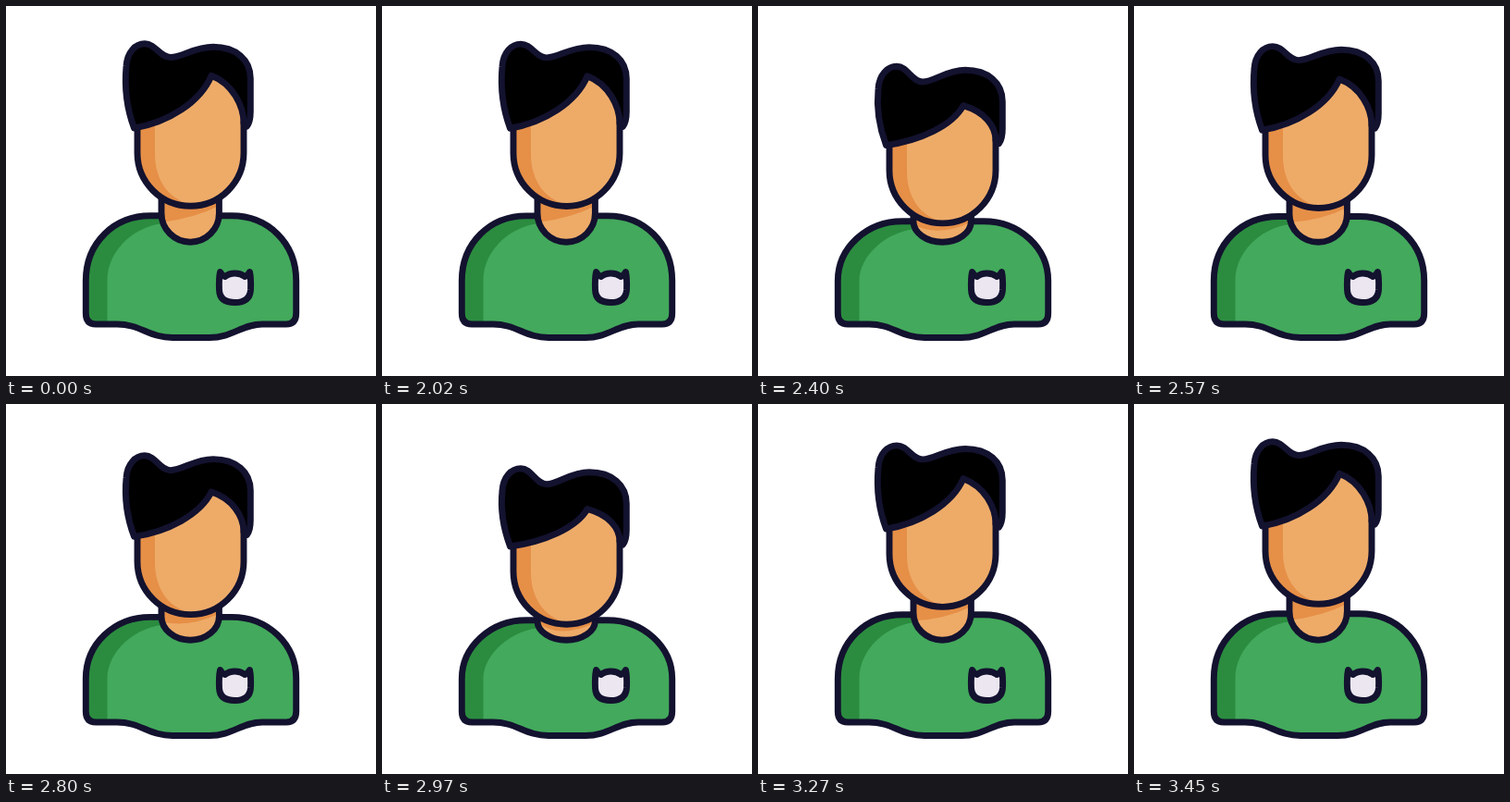
Write an HTML page that moves like this. It is 400 px wide and 400 px high and loops after 3470 ms.

```html
<!DOCTYPE html>
<html lang="en">
<head>
<meta charset="utf-8">
<title>Nodding avatar</title>
<style>
  html, body { margin: 0; width: 100%; height: 100%; overflow: hidden; background: #fff; }
  svg { display: block; width: 100vw; height: 100vh; }
  .line { stroke: #13122f; stroke-width: 6.9; stroke-linecap: round; stroke-linejoin: round; }
</style>
</head>
<body>
<svg viewBox="0 0 400 400">
  <path id="shirt" fill="#43a95c"/>
  <path id="shirtShade" fill="#2b8c3f"/>
  <path id="shirtLine" class="line" fill="none"/>
  <path class="line" fill="#ebe6ef" d="M231.5 287.5Q234 292 237 292.5Q241 289 247.5 289Q254 289 258 292.5Q261 292 263.5 287.5Q265 294 264.5 307Q263.5 320.5 247.5 320.5Q231 320.5 230.5 307Q230 294 231.5 287.5Z"/>
  <path id="neck" fill="#eeab68"/>
  <path id="neckShade" fill="#e68f47"/>
  <path id="neckLine" class="line" fill="none"/>
  <g id="face">
    <path fill="#eeab68" d="M142 76V158.5A57.5 57.5 0 0 0 257 158.5V76Z"/>
    <path fill="#e68f47" d="M142 110H161V160C161 190 178 212 205 215.5A57.5 57.5 0 0 1 142 158.5Z"/>
    <path class="line" fill="none" d="M142 130V158.8A57.5 57.5 0 0 0 257 158.8V126"/>
  </g>
  <path id="hair" class="line"/>
</svg>
<script>
const LOOP = 3470;
const PEAK = 1.16;
const el = id => document.getElementById(id);
const draw = (id, d) => el(id).setAttribute('d', d);
const ease = x => (1 - Math.cos(Math.PI * x)) / 2;

// Two nods; the last rise settles slowly.
const keys = [[2000, 0], [2320, PEAK], [2635, 0], [2960, PEAK], [3460, 0]];

function nodAt(t) {
  const i = keys.findIndex(([time]) => t < time);
  if (i < 1) return 0;
  const [t0, a] = keys[i - 1], [t1, b] = keys[i];
  let x = (t - t0) / (t1 - t0);
  if (i === keys.length - 1) x = 1 - (1 - x) ** 1.45;
  return a + (b - a) * ease(x);
}

function pose(p) {
  const s = 226.8 + 6 * p;
  const shoulder = `M86.3 297C86.3 ${s + 29} 117 ${s} 156 ${s}`;
  const shirt = shoulder + `H244C283 ${s} 313.7 ${s + 29} 313.7 297V332Q313.7 344 303 344H277C255 344 245 358.5 220 358.5H180C155 358.5 145 344 120 344H97Q86.3 344 86.3 332Z`;
  draw('shirt', shirt);
  draw('shirtLine', shirt);
  draw('shirtShade', shoulder + `H175V${s + 8}C140 ${s + 9} 109.5 ${s + 37} 109.5 297V344H97Q86.3 344 86.3 332Z`);

  const n = 224 + 9 * p;
  const neck = `M168 195V${n}A31.2 ${255.2 - n} 0 0 0 230.4 ${n}V195`;
  draw('neck', neck);
  draw('neckLine', neck);
  draw('neckShade', `M168 195V${234 + 2 * p}Q${205 - 12 * p} ${229 + 22 * p} 230.4 ${216 + 18 * p}V195Z`);

  const drop = 19 * p;
  el('face').setAttribute('transform', `translate(0 ${drop})`);

  const tip = 132 + drop, top = 40.8 + 25 * p, dip = 55.5 + 27 * p;
  const crown = 44.3 + 25.5 * p, part = 75.3 + 33 * p;
  draw('hair', `M138.5 ${tip}C131 ${tip - 20} 128 ${87 + 22 * p} 130 ${65 + 25 * p}`
    + `C131 ${top + 9} 140 ${top} 150 ${top}C162 ${top} 166 ${dip} 178 ${dip}`
    + `C190 ${dip} 204 ${crown} 224 ${crown}C249 ${crown} 264.3 ${crown + 14} 264.3 ${crown + 34}`
    + `V${114 + drop}Q264.3 ${125 + drop} 260.5 ${130 + drop}L257 ${127 + drop}`
    + `C257 ${108 + 22 * p} 245 ${84 + 31 * p} 222 ${part}`
    + `C210 ${104 + 26 * p} 175 ${126 + 20 * p} 138.5 ${tip}Z`);
}

function frame() {
  pose(nodAt(performance.now() % LOOP));
  requestAnimationFrame(frame);
}
frame();
</script>
</body>
</html>
```
